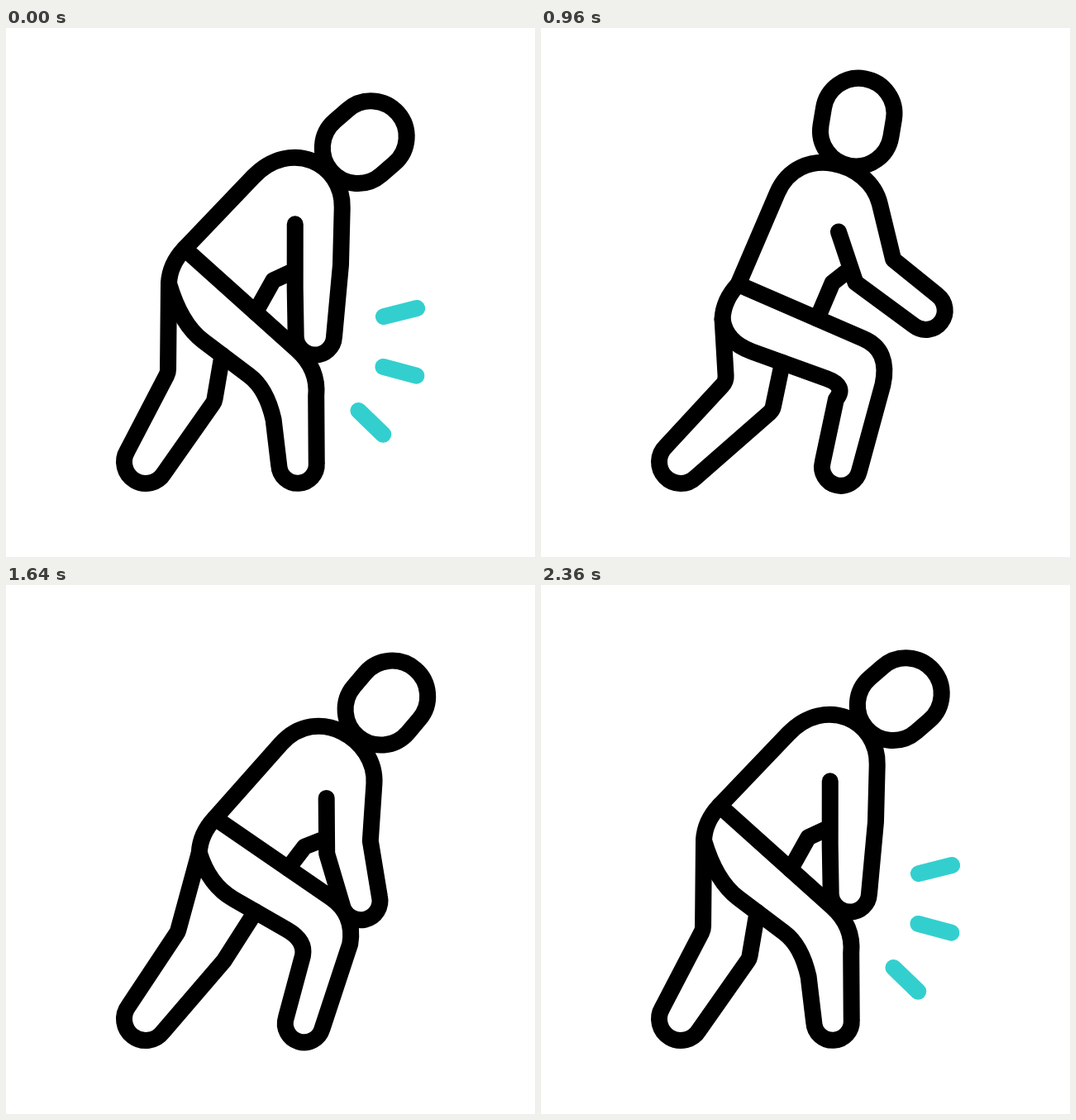
Write an HTML page with a canvas that moves like this. It is 640x640 px and loops after 2.4 s.

```html
<!DOCTYPE html>
<html lang="en">
<head>
<meta charset="utf-8">
<title>Knee pain</title>
<style>
  html, body { margin: 0; width: 100%; height: 100%; overflow: hidden; background: #fff; }
  canvas { display: block; width: 640px; height: 640px; }
</style>
</head>
<body>
<canvas id="stage" width="640" height="640"></canvas>
<script>
const ctx = document.getElementById('stage').getContext('2d');
const LOOP = 2400, RISEN_AT = 800, LEANING_AT = 1400, BENT_AT = 2360;
const BLACK = '#000', TEAL = '#33cfcf';
const RAD = Math.PI / 180;

// Bone angles in degrees, clockwise from the right.
const BENT = {
  hip: [216, 267], spine: -46.3, shoulder: -14.5,
  neck: -30.6, neckLength: 253, tilt: 49,
  forearm: 110, forearmLength: 91,
  thigh: 41.9, thighLength: 183,
  foot: [353, 528], rearKnee: [196, 417], painShift: [0, 0]
};
const RISEN = {
  hip: [234, 315.5], spine: -70.7, shoulder: -33.5,
  neck: -57.8, neckLength: 242, tilt: 3.2,
  forearm: 49, forearmLength: 74,
  thigh: 21.4, thighLength: 165,
  foot: [363, 531], rearKnee: [227, 429], painShift: [40, -29]
};
const LEANING = {
  hip: [259.7, 284.8], spine: -48.8, shoulder: -11.7,
  neck: -34.5, neckLength: 249.5, tilt: 38.7,
  forearm: 97, forearmLength: 70,
  thigh: 33.1, thighLength: 168,
  foot: [362, 531], rearKnee: [210, 420], painShift: [27, 23]
};

const ease = (t, from, to) => {
  const u = Math.min(1, Math.max(0, (t - from) / (to - from)));
  return u * u * (3 - 2 * u);
};
const lerp = (a, b, k) =>
  Array.isArray(a) ? a.map((v, i) => lerp(v, b[i], k)) : a + (b - a) * k;
const add = (p, x, y) => [p[0] + x, p[1] + y];
const polar = (p, angle, r) => add(p, Math.cos(angle * RAD) * r, Math.sin(angle * RAD) * r);
const angleTo = (a, b) => Math.atan2(b[1] - a[1], b[0] - a[0]) / RAD;

// Point at a distance along a bone and to its right-hand side.
const beside = (p, angle, along, side) => polar(polar(p, angle, along), angle + 90, side);

function mixPose(a, b, k) {
  const pose = {};
  for (const name in a) pose[name] = lerp(a[name], b[name], k);
  return pose;
}

function getPose(t) {
  if (t < RISEN_AT) return mixPose(BENT, RISEN, ease(t, 0, RISEN_AT));
  if (t < LEANING_AT) return mixPose(RISEN, LEANING, ease(t, RISEN_AT, LEANING_AT));
  return mixPose(LEANING, BENT, ease(t, LEANING_AT, BENT_AT));
}

// Places every joint from the bone angles.
function getJoints(pose) {
  const { hip, spine, shoulder, thigh } = pose;
  const j = { hip, foot: pose.foot, rearKnee: pose.rearKnee };
  j.back = polar(hip, spine, 120);
  j.chest = polar(hip, shoulder, 197);
  j.armpit = polar(hip, shoulder + 2, 137);
  j.elbow = polar(hip, shoulder + 20.5, 190);
  j.inner = polar(hip, spine + 66, 142);
  j.farElbow = polar(hip, spine + 66, 114);
  j.crook = lerp(j.armpit, j.inner, 0.72);
  j.hand = polar(j.elbow, pose.forearm, pose.forearmLength);
  j.head = polar(hip, pose.neck, pose.neckLength);

  j.knee = polar(hip, thigh, pose.thighLength);
  j.shin = add(j.knee, 23, 56);
  j.calf = polar(j.shin, angleTo(j.shin, j.foot) + 46, 59);
  j.underKnee = beside(j.knee, thigh, -22, 62);
  j.seat = beside(hip, thigh, 2.4 * thigh - 9, 68);
  j.rump = add(hip, -19, 42);
  j.rearCalf = add(j.rearKnee, 56, 35);
  return j;
}

const move = p => ctx.moveTo(...p);
const line = (...points) => points.forEach(p => ctx.lineTo(...p));
const quad = (c, p) => ctx.quadraticCurveTo(...c, ...p);

// Rounded limb end, facing away from the middle of the two joints.
function limbEnd(center, a, b, r) {
  const angle = angleTo(lerp(a, b, 0.5), center) * RAD;
  ctx.arc(...center, r, angle - Math.PI / 2, angle + Math.PI / 2);
}

function drawRearLeg(j) {
  const ankle = [169, 525];
  ctx.beginPath();
  move(lerp(j.seat, j.underKnee, 0.41));
  ctx.arcTo(...j.rearCalf, ...add(ankle, 20, 17), 14);
  limbEnd(ankle, j.rearKnee, j.rearCalf, 26);
  ctx.arcTo(...j.rearKnee, ...j.rump, 16);
  line(j.rump);
  ctx.stroke();
}

function drawFrontLeg(j, thigh) {
  const under = angleTo(j.underKnee, j.seat);
  ctx.beginPath();
  move(j.hip);
  line(j.knee);
  quad(polar(j.knee, thigh, 35), j.shin);
  limbEnd(j.foot, j.shin, j.calf, 22.8);
  line(j.calf);
  quad(polar(j.underKnee, under, -26), j.underKnee);
  line(j.seat);
  quad(polar(j.seat, under, 34), j.rump);
  quad([j.rump[0] + 1, (j.rump[1] + j.hip[1]) / 2 - 2], j.hip);
  ctx.stroke();
}

function drawTorso(j, spine) {
  const upperArm = angleTo(j.elbow, j.chest);
  ctx.beginPath();
  move(j.hip);
  line(j.back);
  ctx.bezierCurveTo(...polar(j.back, spine, 66), ...polar(j.chest, upperArm, 54), ...j.chest);
  line(j.elbow);
  limbEnd(j.hand, j.elbow, j.inner, 23.2);
  line(j.inner, j.crook, j.armpit);
  move(j.crook);
  line(j.farElbow, lerp(j.hip, j.knee, 0.63));
  ctx.stroke();
}

function drawHead(center, tilt) {
  const r = 43, half = 10.5;
  ctx.save();
  ctx.translate(...center);
  ctx.rotate(tilt * RAD);
  ctx.beginPath();
  ctx.arc(0, -half, r, Math.PI, 0);
  ctx.arc(0, half, r, 0, Math.PI);
  ctx.closePath();
  ctx.fill();
  ctx.stroke();
  ctx.restore();
}

// Three rays around the knee slide outwards, then grow back.
function drawPain(t, shift) {
  const returning = t > LEANING_AT;
  const start = returning ? 0 : ease(t, 0, 480);
  const end = returning ? ease(t, 1760, BENT_AT) : 1;
  if (end - start < 0.001) return;
  const center = add([339, 378.5], ...shift);
  ctx.strokeStyle = TEAL;
  ctx.beginPath();
  for (let i = 0; i < 3; i++) {
    const angle = -14 + 29 * i;
    move(polar(center, angle, lerp(121.5, 163, start)));
    line(polar(center, angle, lerp(121.5, 163, end)));
  }
  ctx.stroke();
}

function draw(t) {
  const pose = getPose(t), joints = getJoints(pose);
  ctx.fillStyle = '#fff';
  ctx.fillRect(0, 0, 640, 640);
  ctx.lineWidth = 20;
  ctx.lineCap = ctx.lineJoin = 'round';
  ctx.strokeStyle = BLACK;
  drawRearLeg(joints);
  drawFrontLeg(joints, pose.thigh);
  drawTorso(joints, pose.spine);
  drawHead(joints.head, pose.tilt);
  drawPain(t, pose.painShift);
}

const startTime = performance.now();
function tick() {
  draw((performance.now() - startTime) % LOOP);
  requestAnimationFrame(tick);
}
tick();
</script>
</body>
</html>
```
